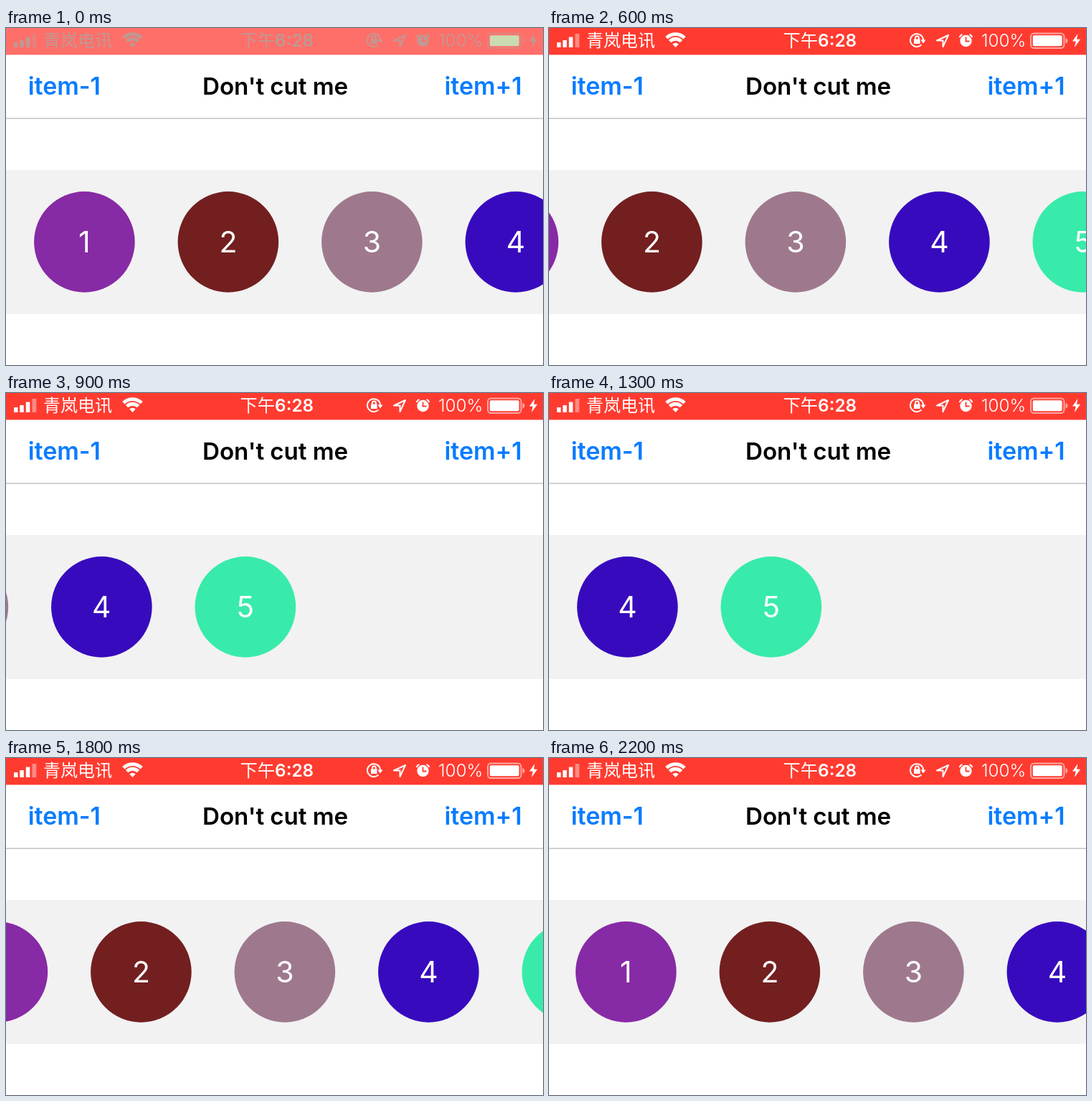
Recreate the animation shown at these times as an HTML page. Size 749 px wide and 470 px high, loop 2.3 s.

```html
<!DOCTYPE html>
<html lang="zh">
<head>
<meta charset="utf-8">
<style>
  html, body { margin: 0; width: 100%; height: 100%; overflow: hidden; background: #fff; }
  svg { display: block; width: 749px; height: 470px; font-family: Inter, "Noto Sans CJK SC", "Noto Sans CJK", sans-serif; }
  .nav { font-size: 33.2px; font-weight: 600; letter-spacing: -.1px; }
  .button { font-size: 34px; fill: #0a7cff; }
  .line { fill: none; stroke: currentColor; stroke-width: 2; }
  #status { font-size: 24px; fill: currentColor; }
  #items { font-size: 41px; text-anchor: middle; }
</style>
</head>
<body>
<svg viewBox="0 0 749 470">
  <rect id="bar" width="749" height="37.4"/>
  <g id="status">
    <!-- signal -->
    <path d="M11 20h5.5v7h-5.5zM19.3 17h5.5v10h-5.5zM27.8 12.5h5.5v14.5h-5.5z"/>
    <rect x="36.5" y="8" width="5.8" height="19" opacity=".4"/>
    <text x="52" y="26.3">青岚电讯</text>
    <!-- wifi -->
    <path class="line" style="stroke-width:4.8" d="M163.9 13.8A17.8 17.8 0 0 1 189.1 13.8M168.6 18.6A11 11 0 0 1 184.4 18.6"/>
    <path d="M172.3 22.4A6 6 0 0 1 180.7 22.4L176.5 27z"/>
    <text x="326.5" y="26" font-size="24.3" font-weight="500">下午<tspan font-weight="600">6:28</tspan></text>
    <!-- rotation lock -->
    <path class="line" d="M519.5 23.4A9 9 0 1 1 522 17M511 16v-2a2.4 2.4 0 0 1 4.8 0v2"/>
    <path d="M518.5 16.5h7l-3.5 5zM509 15.5h8.6v6.5h-8.6z"/>
    <!-- location -->
    <path class="line" stroke-linejoin="round" d="M541 17.5L557 10L549.5 26V17.5z"/>
    <!-- alarm -->
    <circle cx="581.5" cy="18" r="8.2"/>
    <path class="line" d="M572.6 13Q573.5 10 576.5 9M586.5 9Q589.5 10 590.4 13"/>
    <path id="hands" fill="none" stroke-width="1.8" d="M581.5 12.5v6h5"/>
    <text x="603" y="26" font-size="24.3" font-weight="300">100%</text>
    <!-- battery -->
    <rect class="line" x="672" y="7.5" width="46.5" height="20.5" rx="4.5" opacity=".55"/>
    <path opacity=".55" d="M720.5 14q3 1 3 3.7t-3 3.8z"/>
    <rect id="charge" x="674.8" y="10.2" width="40.8" height="15" rx="2"/>
    <path d="M737.5 8L730 18.6h4.8L733 27L741.2 15.8h-5z"/>
  </g>
  <g class="nav">
    <text class="button" x="30.8" y="93.3">item-1</text>
    <text x="375.5" y="93.3" text-anchor="middle">Don't cut me</text>
    <text class="button" x="719.5" y="93.3" text-anchor="end">item+1</text>
  </g>
  <rect y="125.4" width="749" height="1.5" fill="#c2c2c2"/>
  <rect y="198" width="749" height="201" fill="#f2f2f2"/>
  <g id="items"></g>
</svg>
<script>
const LOOP = 2300, TICK = 100, END = 601.5, PITCH = 200.5;
const $ = id => document.getElementById(id);
const mix = (a, b, k) => `rgb(${a.map((v, i) => Math.round(v + (b[i] - v) * k))})`;

$('items').innerHTML = ['#872aa5', '#731f1f', '#9e798e', '#370bbd', '#38ebaa'].map((color, i) => {
  const x = 109.4 + i * PITCH;
  return `<circle cx="${x}" cy="298.4" r="70.3" fill="${color}"/><text x="${x}" y="313.3" fill="#fff">${i + 1}</text>`;
}).join('');

// A flick in each direction: a short drag, then exponential deceleration.
function scrollAt(t) {
  if (t < 600) return 0;
  if (t < 1300) return END - 435 * Math.exp(-(t - 600) / 103.5);
  if (t < 1600) return END;
  if (t < 1700) return 540;
  return 121.5 * Math.exp(-(t - 1800) / 97.4);
}

function draw(now) {
  const t = Math.floor(now % LOOP / TICK) * TICK;
  const fade = Math.max(0, 1 - t / 123);
  const red = mix([255, 59, 48], [255, 111, 105], fade);
  $('bar').style.fill = $('hands').style.stroke = red;
  $('status').style.color = mix([255, 255, 255], [192, 152, 147], fade);
  $('charge').style.fill = mix([255, 255, 255], [202, 219, 177], fade);
  $('items').setAttribute('transform', `translate(${-scrollAt(t)})`);
}

const start = performance.now();
function loop() {
  draw(performance.now() - start);
  requestAnimationFrame(loop);
}
loop();
</script>
</body>
</html>
```
